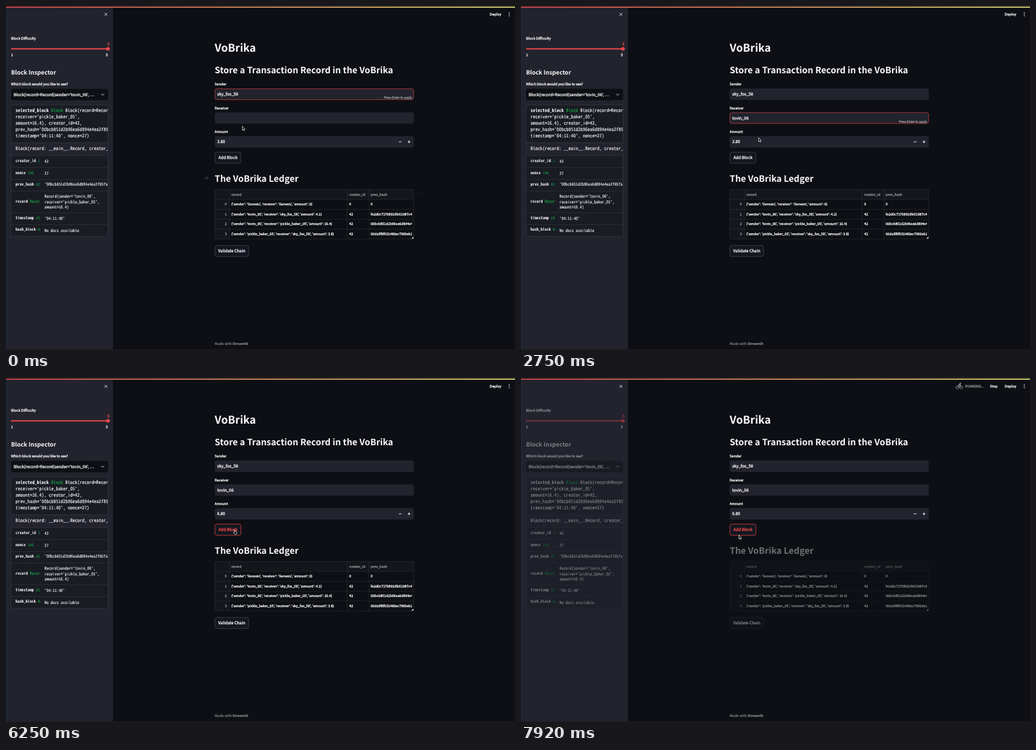
An HTML page with a canvas for the animation above (8000 ms loop, 800 by 542 pixels).

```html
<!DOCTYPE html>
<html lang="en">
<head>
<meta charset="utf-8">
<title>Ledger demo</title>
<style>
html, body { margin: 0; width: 100%; height: 100%; overflow: hidden; background: #0d0f14; }
canvas { display: block; width: 800px; height: 542px; }
</style>
</head>
<body>
<canvas id="stage"></canvas>
<script>
const W = 800, H = 542, LOOP = 8000;
const ZOOM = 313 / 704;   // page pixels to stage pixels
const canvas = document.getElementById('stage');
const ctx = canvas.getContext('2d');
const dpr = window.devicePixelRatio || 1;
canvas.width = W * dpr;
canvas.height = H * dpr;

const SANS = '"Noto Sans CJK JP", "Noto Sans CJK SC", "Noto Sans", sans-serif';
const MONO = '"Noto Sans Mono CJK JP", "Noto Sans Mono CJK SC", "Noto Sans Mono", monospace';
const RED = '#ff4b4b', WHITE = '#fafafa', GRAY = 'rgba(250,250,250,.5)', GREEN = '#15a94a';
const PAGE = '#0d0f14', PANEL = '#22232d', CODE = '#1a1c24', HEAD = '#14161c';
const LINE = 'rgba(250,250,250,.12)', EDGE = 'rgba(250,250,250,.25)';

const APP = 'VoBrika', ANN = 'tovin_06', BOB = 'sky_fox_58', CAT = 'pickle_baker_05';
const HASH = '00bcb851d2b96ea6d894e4ea2f85fa';

// Monospace glyphs are sized so that one cell is 0.6 em wide.
ctx.font = `100px ${MONO}`;
const monoScale = 60 / ctx.measureText('0').width;
const SANS_SCALE = 0.894, BOLD_SCALE = 0.866;

const clamp = v => Math.max(0, Math.min(1, v));
const during = (t, a, b) => t >= a && t < b;

// Text is set at ten times its size and scaled down, so spacing stays fractional.
// y is the middle of the capitals.
function text(str, x, y, size = 16, { color = WHITE, bold = false, align = 'left', mono = false } = {}) {
  const px = size * ZOOM;
  const em = px * (mono ? monoScale : bold ? BOLD_SCALE : SANS_SCALE);
  ctx.save();
  ctx.translate(x, y + px * 0.33);
  ctx.scale(0.1, 0.1);
  ctx.font = `${bold ? 700 : 400} ${em * 10}px ${mono ? MONO : SANS}`;
  ctx.textRendering = 'geometricPrecision';
  ctx.textAlign = align;
  ctx.fillStyle = ctx.strokeStyle = color;
  ctx.fillText(str, 0, 0);
  if (!bold) {   // small light text reads heavier than the regular weight
    ctx.lineWidth = mono ? 1.2 : 3;
    ctx.lineJoin = 'round';
    ctx.strokeText(str, 0, 0);
  }
  ctx.restore();
}

function rect(x, y, w, h, color) {
  ctx.fillStyle = color;
  ctx.fillRect(x, y, w, h);
}

function box(x, y, w, h, fill, stroke, width = 0.7, r = 3.5) {
  ctx.beginPath();
  ctx.roundRect(x, y, w, h, r);
  if (fill) { ctx.fillStyle = fill; ctx.fill(); }
  if (stroke) { ctx.strokeStyle = stroke; ctx.lineWidth = width; ctx.stroke(); }
}

function path(points, color, width = 0.9) {
  ctx.beginPath();
  points.forEach(([x, y], i) => i ? ctx.lineTo(x, y) : ctx.moveTo(x, y));
  ctx.strokeStyle = color;
  ctx.lineWidth = width;
  ctx.stroke();
}

function disc(x, y, r, color) {
  ctx.beginPath();
  ctx.arc(x, y, r, 0, 7);
  ctx.fillStyle = color;
  ctx.fill();
}

function ring(x, y, r, color, width = 0.7) {
  ctx.beginPath();
  ctx.arc(x, y, r, 0, 7);
  ctx.strokeStyle = color;
  ctx.lineWidth = width;
  ctx.stroke();
}

function faded(alpha, draw) {
  ctx.save();
  ctx.globalAlpha = alpha;
  draw();
  ctx.restore();
}

function clipped(x, y, w, h, draw) {
  ctx.save();
  ctx.beginPath();
  ctx.rect(x, y, w, h);
  ctx.clip();
  draw();
  ctx.restore();
}

// ---- timeline ----
const RECEIVER_AT = 330, AMOUNT_AT = 2920, CLICK_AT = 6250;
const NAME_START = 1050, KEY_GAP = 165;
const NAME_END = NAME_START + (ANN.length - 1) * KEY_GAP;
const AMOUNT_KEYS = [4330, 4580, 4830];

function formState(t) {
  const typed = t < NAME_START ? 0 : Math.min(ANN.length, 1 + Math.floor((t - NAME_START) / KEY_GAP));
  const digits = AMOUNT_KEYS.filter(k => t >= k).length;
  const focus = t < RECEIVER_AT ? 'sender' : t < AMOUNT_AT ? 'receiver' : t < CLICK_AT ? 'amount' : 'button';
  const lastKey = focus === 'receiver'
    ? (typed ? Math.min(NAME_END, NAME_START + (typed - 1) * KEY_GAP) : RECEIVER_AT)
    : digits ? AMOUNT_KEYS[digits - 1] : AMOUNT_AT;
  return {
    focus,
    receiver: ANN.slice(0, typed),
    amount: t >= CLICK_AT ? '6.80' : digits ? '6.8'.slice(0, digits) : '3.80',
    selected: during(t, 3100, AMOUNT_KEYS[0]),
    edited: focus === 'sender' || (focus === 'receiver' && typed > 0) || (focus === 'amount' && digits > 0),
    caret: (focus === 'receiver' || focus === 'amount') && (t - lastKey) % 1000 < 500
  };
}

const MOVES = [
  [[0, 371, 189], [80, 371, 189], [260, 369, 178], [420, 369, 178]],
  [[2500, 369, 178], [2750, 373, 207], [2920, 341, 214], [3200, 339, 214]],
  [[5080, 345, 214], [5500, 355, 249], [5750, 356, 249], [6080, 358, 239], [7200, 358, 239], [7700, 342, 247], [8000, 342, 247]]
];

function pointerAt(t) {
  const leg = MOVES.find(m => during(t, m[0][0], m[m.length - 1][0]));
  if (!leg) return null;
  const i = leg.findIndex(k => k[0] > t);
  const [t0, x0, y0] = leg[i - 1], [t1, x1, y1] = leg[i];
  const u = (t - t0) / (t1 - t0), e = u * u * (3 - 2 * u);
  return [x0 + (x1 - x0) * e, y0 + (y1 - y0) * e];
}

// ---- sidebar ----
function slider() {
  text('Block Difficulty', 8, 51, 14);
  rect(8, 66.6, 152, 1.8, RED);
  disc(160.3, 67.5, 2.7, RED);
  text('5', 161, 60, 14, { color: RED, align: 'center' });
  text('1', 8, 77, 14);
  text('5', 160, 77, 14, { align: 'right' });
}

function inspector() {
  const mono = (s, x, y, size, more) => text(s, x, y, size, { mono: true, ...more });
  text('Block Inspector', 8, 104, 24, { bold: true });
  text('Which block would you like to see?', 8, 123, 14);
  box(8, 130.5, 152.5, 18, PAGE);
  text(`Block(record=Record(sender='${ANN}', …`, 12, 139.5);
  path([[149.8, 138.4], [152, 140.6], [154.2, 138.4]], WHITE);

  box(8, 156, 152.5, 207, CODE, LINE, 0.7, 2);
  rect(8, 215, 152.5, 20.5, PANEL);
  [215, 235.5, 254, 273, 291, 325.5, 344].forEach(y => rect(8, y, 152.5, 0.6, LINE));
  clipped(8, 156, 152.2, 207, () => {
    mono('selected_block', 15, 165, 14, { bold: true });
    mono('Block', 71, 165, 14, { color: GREEN });
    mono('Block(record=Record(', 93.3, 165, 14);
    [`receiver='${CAT}',`, 'amount=16.4), creator_id=42,', `prev_hash='${HASH}`, "timestamp='04:11:40', nonce=27)"]
      .forEach((s, i) => mono(s, 15, 175 + i * 9.9, 14));
    mono('Block(record: __main__.Record, creator_id', 15, 225, 14);
    [[245.5, '42'], [264, '27'], [281.5, `'${HASH}'`], [300, `Record(sender='${ANN}',`],
     [309, `receiver='${CAT}',`], [317.5, 'amount=16.4)'], [335, "'04:11:40'"], [354, 'No docs available']]
      .forEach(([y, s]) => mono(s, 60.5, y, 12));
  });
  clipped(8, 236, 46, 126, () => {
    [[244, 'creator_id', 'int'], [263, 'nonce', 'int'], [281.5, 'prev_hash', 'str'],
     [308, 'record', 'Record'], [334, 'timestamp', 'str'], [352.5, 'hash_block', 'method']]
      .forEach(([y, name, type]) => {
        mono(name, 15, y, 12, { bold: true });
        mono(type, 15 + (name.length + 1) * 7.2 * ZOOM, y, 12, { color: GREEN });
      });
  });
}

function sidebar(alpha) {
  rect(0, 0, 168, H, PANEL);
  path([[154.8, 11], [159.2, 15.4]], WHITE, 0.8);
  path([[159.2, 11], [154.8, 15.4]], WHITE, 0.8);
  faded(alpha, () => { slider(); inspector(); });
}

// ---- main column ----
function field(label, value, y, focused, hint, hintX, hintY) {
  text(label, 328, y - 16, 14);
  box(328, y - 8.9, 313, 17.8, PANEL);
  if (focused) box(328.3, y - 8.6, 312.4, 17.2, null, RED, 0.55);
  text(value, 332, y);
  if (hint) text('Press Enter to apply', hintX, hintY, 12, { color: GRAY, align: 'right' });
}

function button(label, y, w, color, border) {
  box(328.3, y - 8.8, w, 17.6, '#131720', border);
  text(label, 328.3 + w / 2, y, 16, { color, align: 'center' });
}

function caretAfter(value, y) {
  ctx.font = `100px ${SANS}`;
  const w = ctx.measureText(value).width / 100 * 16 * ZOOM * SANS_SCALE;
  rect(332.2 + w, y - 4.6, 0.8, 9.2, WHITE);
}

function form(s, t) {
  const hint = name => s.edited && s.focus === name;
  text(APP, 328, 65.2, 44, { bold: true });
  text(`Store a Transaction Record in the ${APP}`, 328, 101.2, 36, { bold: true });
  field('Sender', BOB, 139, s.focus === 'sender', hint('sender'), 638, 144);
  field('Receiver', s.receiver, 176.5, s.focus === 'receiver', hint('receiver'), 638, 182);
  field('Amount', s.amount, 214, s.focus === 'amount', hint('amount'), 608, 219.2);
  if (s.selected) {
    rect(331.8, 209.2, 12.6, 9.6, '#4779b3');
    text(s.amount, 332, 214);
  } else if (s.caret) {
    s.focus === 'receiver' ? caretAfter(s.receiver, 176.5) : caretAfter(s.amount, 214);
  }
  rect(617.5, 213.5, 4, 1, WHITE);
  rect(631.5, 213.5, 4, 1, WHITE);
  rect(633, 212, 1, 4, WHITE);
  const hot = t >= 5960;
  button('Add Block', 239, 41, hot ? RED : WHITE, hot ? RED : EDGE);
}

function ledger() {
  text(`The ${APP} Ledger`, 328, 271.5, 36, { bold: true });
  const top = 289, row = 15.6, bottom = 367, size = 13.3;
  rect(328, top, 312.5, row, HEAD);
  rect(328, top + row, 23, bottom - top - row, HEAD);
  for (let i = 1; i < 5; i++) rect(328, top + i * row, 312.5, 0.6, LINE);
  [351, 536, 570].forEach(x => rect(x, top, 0.6, bottom - top, LINE));
  box(328.3, top, 312.4, bottom - top, null, LINE, 0.7, 3);

  const entry = (a, b, n) => `{'sender': '${a}', 'receiver': '${b}', 'amount': ${n}}`;
  const rows = [
    [entry('Genesis', 'Genesis', 0), '0', '0'],
    [entry(ANN, BOB, 4.2), '42', 'fe2d0c71708910fe51987c4d'],
    [entry(ANN, CAT, 16.4), '42', HASH],
    [entry(CAT, BOB, 3.8), '42', '00da5f8f631480ec7990eb27']
  ];
  const xs = [354.3, 539.5, 573.3];
  clipped(328, top, 310, bottom - top, () => {
    ['record', 'creator_id', 'prev_hash'].forEach((s, c) => text(s, xs[c], 296.6, size, { color: GRAY }));
    rows.forEach((cells, i) => {
      const y = 312.1 + i * row;
      text(String(i), 347, y, size, { color: GRAY, align: 'right' });
      cells.forEach((s, c) => text(s, xs[c], y, size));
    });
  });
  ctx.beginPath();
  ctx.moveTo(640.3, 363.6);
  ctx.lineTo(640.3, 366.6);
  ctx.lineTo(637.3, 366.6);
  ctx.fillStyle = WHITE;
  ctx.fill();
  button('Validate Chain', 386, 53, WHITE, EDGE);
}

function hoverTools(alpha) {
  faded(alpha, () => {
    ring(314.3, 271.8, 1.3, '#4b4d55', 0.8);
    ring(316.5, 270.6, 1.3, '#4b4d55', 0.8);
    path([[652.3, 293], [654.6, 295.4]], '#3c3e46', 0.8);
  });
}

// ---- header ----
function walker() {
  const c = '#8b8c91';
  disc(688.7, 9.3, 1.3, c);
  path([[684.8, 10.4], [687.3, 11.8], [690.1, 11.8], [692.6, 10.4]], c);
  path([[688.7, 11.5], [688.7, 14.2]], c, 2.2);
  path([[687, 17.6], [688.1, 14], [689.3, 14], [690.4, 17.6]], c, 0.9);
}

function cyclist() {
  const c = '#a3a4a8';
  ring(685.8, 15, 2.3, c);
  ring(692, 15, 2.3, c);
  path([[685.8, 15], [687.6, 12.3], [690.6, 12.3], [688.8, 15], [687.6, 12.3]], c, 0.7);
  path([[692, 15], [690.2, 10.9], [691.6, 10.6]], c, 0.7);
  path([[687.2, 11.8], [689.2, 9.8], [690.8, 11.2]], c, 1.2);
  disc(690.5, 8.6, 1.1, c);
}

function header(t) {
  const early = during(t, 400, 800), mid = during(t, 3060, 3290), late = t >= 6450;
  if (early || mid || late) {
    const alpha = early ? clamp((t - 380) / 240)
      : mid ? clamp((t - 3040) / 240) : clamp((t - 6430) / 250);
    faded(alpha, () => {
      late ? cyclist() : walker();
      text('RUNNING...', 698, 13, 14, { color: GRAY });
      text('Stop', 737, 13, 14);
    });
  }
  text('Deploy', 760.3, 13, 14);
  [10.6, 13, 15.4].forEach(y => disc(791, y, 0.75, WHITE));

  const g = ctx.createLinearGradient(0, 0, W, 0);
  g.addColorStop(0, '#d8484c');
  g.addColorStop(1, '#e5e077');
  rect(0, 0, W, 1, '#15161c');
  rect(0, 1, W, 1.7, g);
  rect(0, 3, 0.8, H - 3, '#1d3447');
  rect(0, H - 1, W, 1, '#1b1d24');
}

// ---- pointer ----
function outline(points, x, y) {
  ctx.beginPath();
  points.forEach(([px, py]) => ctx.lineTo(x + px, y + py));
  ctx.closePath();
  ctx.fillStyle = '#000';
  ctx.fill();
  ctx.strokeStyle = '#fff';
  ctx.lineWidth = 0.7;
  ctx.lineJoin = 'round';
  ctx.stroke();
}

const ARROW = [[0.5, 0.5], [0.5, 6.4], [1.8, 5.3], [2.7, 7.4], [3.7, 7], [2.8, 5], [4.6, 4.8]];
const HAND = [[0.7, 0.5], [1.6, 0.5], [1.7, 2.7], [4.8, 3.3], [4.6, 6], [4, 7.2], [1.6, 7.2], [-0.6, 4.4], [0, 3.9], [0.8, 4.5]];

function pointer(t) {
  const p = pointerAt(t);
  if (!p) return;
  const [x, y] = p;
  if (during(y, 172, 184) || during(y, 209, 221)) {
    path([[x, y - 3.5], [x, y + 3.5]], '#d0d0d0', 0.7);
  } else {
    outline(during(y, 230, 246.5) ? HAND : ARROW, x, y);
  }
}

function draw(t) {
  ctx.setTransform(dpr, 0, 0, dpr, 0, 0);
  rect(0, 0, W, H, PAGE);
  const stale = 1 - 0.62 * Math.pow(clamp((t - 6950) / 1000), 1.7);
  sidebar(stale);
  form(formState(t), t);
  faded(stale, ledger);
  if (t < 400) hoverTools(1 - t / 400);
  text('Made with ', 328, 532, 14, { color: 'rgba(250,250,250,.35)' });
  text('Streamlit', 356, 532, 14, { color: 'rgba(250,250,250,.65)', bold: true });
  header(t);
  pointer(t);
}

const start = performance.now();
function tick() {
  draw((performance.now() - start) % LOOP);
  requestAnimationFrame(tick);
}
tick();
</script>
</body>
</html>
```
